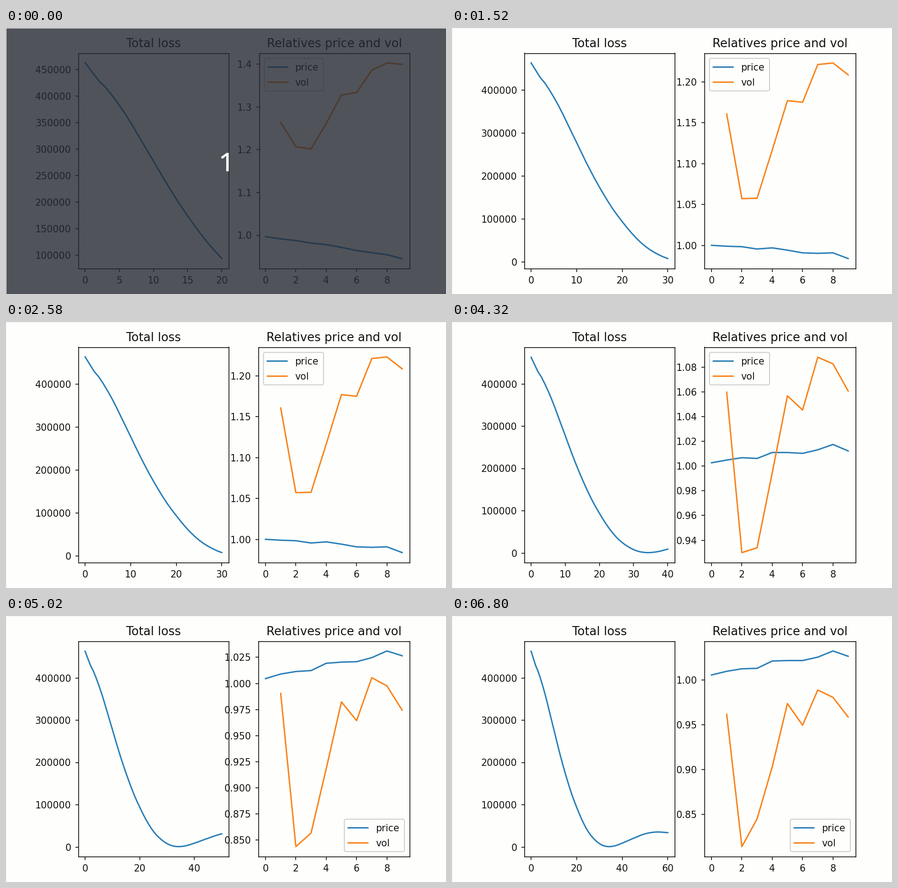
Recreate the animation shown at these times as a matplotlib script. Size 963 px wide and 582 px high, loop 8000 ms.

```python
import numpy as np
import matplotlib.pyplot as plt
from matplotlib.animation import FuncAnimation
from matplotlib.patches import FancyBboxPatch, Polygon, Rectangle
from matplotlib.ticker import MultipleLocator

W, H, DPI = 963, 582, 96
LOOP, STEP = 8000, 40
PT = 72 / DPI  # points per pixel
PAPER, INK, BLUE, ORANGE = "#fefffc", "#111111", "#2b7fb8", "#fa831c"
TOP, BOTTOM = 55.5, 526.5
STARTS = [0, 1520, 3280, 5020, 6800]

plt.rcParams.update({
    "font.family": "DejaVu Sans",
    "text.color": INK,
    "axes.edgecolor": INK,
    "axes.linewidth": 1.7 * PT,
    "axes.titlesize": 26 * PT,
    "axes.titlepad": 13 * PT,
    "lines.linewidth": 3.1 * PT,
})

# Loss in thousands at chosen epochs
KNOT_X = np.array([0, 1, 2, 3, 4, 5, 6, 7, 8, 10, 12, 14, 16, 18, 20,
                   22, 25, 28, 31, 34, 37, 40, 45, 50, 55, 60], float)
KNOT_Y = np.array([463, 445.8, 428.9, 416.4, 400.4, 382.8, 363.8, 343.1, 321,
                   277.6, 233.6, 193, 156, 122.4, 94, 68, 37, 17, 4.9, 1,
                   3.2, 9.2, 20.8, 31.2, 35.5, 34])


def hermite(x, xs, ys):
    slope = np.gradient(ys, xs)
    i = np.clip(np.searchsorted(xs, x, side="right") - 1, 0, len(xs) - 2)
    h = xs[i + 1] - xs[i]
    u = (x - xs[i]) / h
    return ((1 + 2 * u) * (1 - u) ** 2 * ys[i] + u * (1 - u) ** 2 * h * slope[i]
            + u * u * (3 - 2 * u) * ys[i + 1] + u * u * (u - 1) * h * slope[i + 1])


EPOCHS = np.arange(61)
LOSS = 1000 * hermite(EPOCHS, KNOT_X, KNOT_Y)

# Axis scales are (value, pixel row, pixels per unit, tick step)
STAGES = [
    dict(n=20, xstep=5, loss=(1e5, 497, 58 / 5e4, 5e4),
         rel=(1.0, 453.5, 936.25, 0.1), left=554.5, legend=(0, 0),
         price=[.9968, .9915, .9877, .9818, .9781, .9717, .9642, .9594, .9546, .9455],
         vol=[1.2638, 1.2067, 1.2019, 1.2612, 1.3279, 1.3338, 1.3856, 1.4027, 1.3995]),
    dict(n=30, xstep=10, loss=(0, 512, 94.1 / 1e5, 1e5),
         rel=(1.0, 475.5, 1787.5, 0.05), left=552.5, legend=(0, 0),
         price=[1.0, .9989, .9983, .9955, .9969, .9941, .9908, .9902, .9908, .9838],
         vol=[1.1608, 1.0571, 1.0576, 1.1166, 1.1771, 1.1751, 1.2213, 1.2232, 1.2087]),
    dict(n=40, xstep=10, loss=(0, 505.5, 92.5 / 1e5, 1e5),
         rel=(1.0, 315.3, 2703.6, 0.02), left=552.5, legend=(0, 0),
         price=[1.0027, 1.0049, 1.0068, 1.0062, 1.011, 1.011, 1.0103, 1.0132, 1.0175, 1.0123],
         vol=[1.0598, .93, .9339, .9946, 1.0569, 1.0454, 1.0881, 1.0828, 1.0608]),
    dict(n=50, xstep=20, loss=(0, 505.5, 92.5 / 1e5, 1e5),
         rel=(1.0, 147.5, 2283, 0.025), left=552.5, legend=(177, 378),
         price=[1.0046, 1.009, 1.0114, 1.0123, 1.0193, 1.0204, 1.0208, 1.0247, 1.0311, 1.0265],
         vol=[.9904, .8436, .8566, .9183, .9823, .9643, 1.0055, .9976, .9744]),
    dict(n=60, xstep=20, loss=(0, 505.5, 92.5 / 1e5, 1e5),
         rel=(1.0, 140, 1960, 0.05), left=552.5, legend=(177, 378),
         price=[1.0056, 1.0097, 1.0125, 1.013, 1.0212, 1.0217, 1.0217, 1.0255, 1.0324, 1.0265],
         vol=[.9617, .814, .8449, .9031, .9737, .9495, .9888, .9806, .9587]),
]

fig = plt.figure(figsize=(W / DPI, H / DPI), dpi=DPI, facecolor=PAPER)


def box(left, right):
    return [left / W, 1 - BOTTOM / H, (right - left) / W, (BOTTOM - TOP) / H]


def panel(left, right, title):
    ax = fig.add_axes(box(left, right), facecolor="none")
    ax.set_title(title)
    ax.tick_params(length=7 * PT, width=1.7 * PT, color=INK,
                   labelcolor=INK, labelsize=20.5 * PT)
    ax.tick_params(axis="x", pad=9.5 * PT)
    ax.tick_params(axis="y", pad=9 * PT)
    return ax


def scale_y(ax, value, row, per_unit, step):
    ax.set_ylim(value - (BOTTOM - row) / per_unit, value + (row - TOP) / per_unit)
    ax.yaxis.set_major_locator(MultipleLocator(step))


def scale_x(ax, left, right, zero, per_unit, step):
    ax.set_xlim((left - zero) / per_unit, (right - zero) / per_unit)
    ax.xaxis.set_major_locator(MultipleLocator(step))


loss_ax = panel(158.5, 487.5, "Total loss")
rel_ax = panel(552.5, 883.5, "Relatives price and vol")
loss_line, = loss_ax.plot([], [], color=BLUE)
price_line, = rel_ax.plot([], [], color=BLUE)
vol_line, = rel_ax.plot([], [], color=ORANGE)

# Pixel-space layer for the legend, veil and countdown digit
top = fig.add_axes([0, 0, 1, 1])
top.set(xlim=(0, W), ylim=(H, 0))
top.axis("off")
frame = FancyBboxPatch((0, 0), 1, 1, boxstyle="round,pad=0,rounding_size=4",
                       fc="none", ec="#cccccc", lw=2 * PT)
top.add_patch(frame)
keys = []
for name, color, row in (("price", BLUE, 85), ("vol", ORANGE, 117.5)):
    line, = top.plot([], [], color=color, solid_capstyle="butt")
    label = top.text(0, 0, name, size=20.6 * PT, va="baseline")
    keys.append((line, label, row))

veil = Rectangle((0, 0), W, H, fc="#242832", alpha=0.8, lw=0, zorder=5)
digit = Polygon([(487.5, 313.5), (482, 313.5), (482, 279.5), (473.5, 286.5),
                 (470.3, 282.4), (482.8, 273.3), (487.5, 273.3)],
                fc="white", lw=0, zorder=6)
top.add_patch(veil)
top.add_patch(digit)
for w, h in ((W, 1), (1, H)):
    top.add_patch(Rectangle((0, 0), w, h, fc="#f0f1ee", lw=0, zorder=7))


def place_legend(left, dx, dy):
    inset = left - 552.5
    frame.set_bounds(563.5 + inset + dx, 66.5 + dy, 131.5 - inset, 71)
    for line, label, row in keys:
        line.set_data([570 + inset + dx, 616 + inset + dx], [row + dy] * 2)
        label.set_position((632.5 + dx, row + 8 + dy))


def update(i):
    t = i * STEP
    s = STAGES[sum(t + STEP / 2 >= a for a in STARTS) - 1]
    n = s["n"]
    loss_line.set_data(EPOCHS[:n + 1], LOSS[:n + 1])
    scale_x(loss_ax, 158.5, 487.5, 173.2, 299 / n, s["xstep"])
    scale_y(loss_ax, *s["loss"])

    rel_ax.set_position(box(s["left"], 883.5))
    price_line.set_data(range(10), s["price"])
    vol_line.set_data(range(1, 10), s["vol"])
    scale_x(rel_ax, s["left"], 883.5, 568, 299 / 9, 2)
    scale_y(rel_ax, *s["rel"])

    place_legend(s["left"], *s["legend"])
    veil.set_visible(i == 0)
    digit.set_visible(i == 0)
    return ()


anim = FuncAnimation(fig, update, frames=LOOP // STEP, interval=STEP,
                     init_func=lambda: update(0), repeat=True, repeat_delay=0)
plt.show()
```
